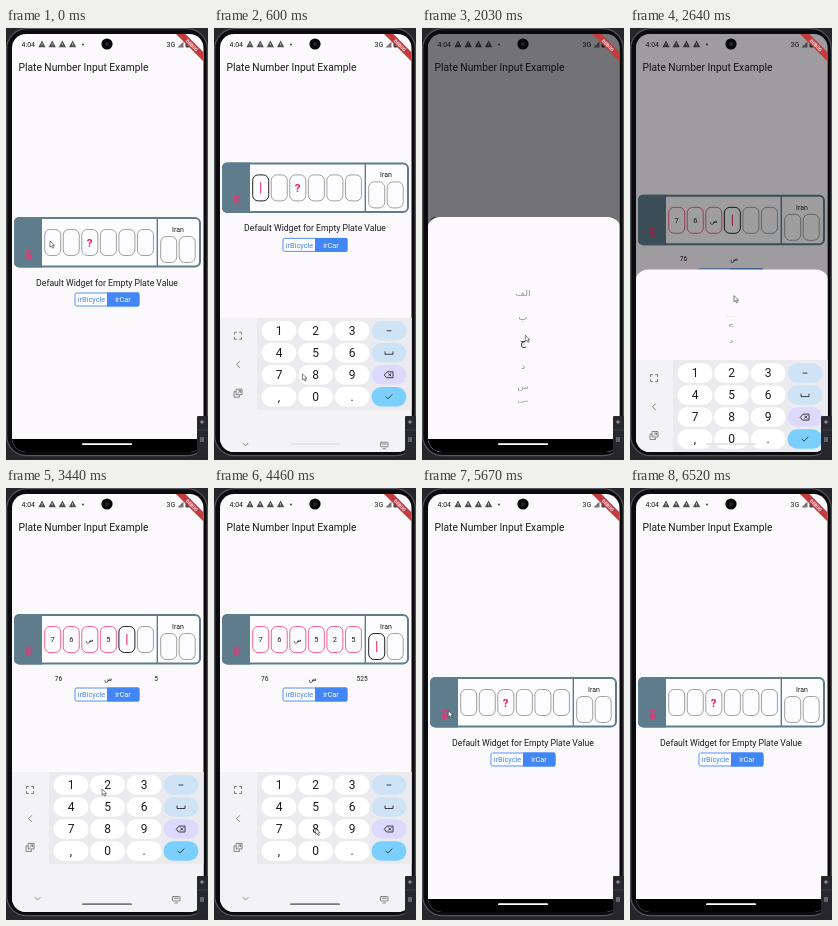
An HTML page for the animation above (6.54 s loop, 202x432 px).

```html
<!DOCTYPE html>
<html lang="en">
<head>
<meta charset="utf-8">
<title>Plate Number Input Example</title>
<style>
html, body { margin: 0; width: 100%; height: 100%; overflow: hidden; background: #26262a; }
svg { display: block; width: 100vw; height: 100vh; }
text { font-family: Roboto, "DejaVu Sans", sans-serif; fill: #1d1b20; }
.mid { text-anchor: middle; }
.line { fill: none; stroke: #2c2d31; stroke-width: .9; stroke-linecap: round; stroke-linejoin: round; }
.side .line { stroke: #77797e; }
.box { fill: #fdfcfe; stroke: #858b91; stroke-width: .8; }
.box.full { stroke: #ee3f78; }
.box.focus { stroke: #222; stroke-width: 1; }
.tone { fill: #5f7c8d; }
.edge { fill: none; stroke: #5f7c8d; stroke-width: 2; }
.trash { fill: none; stroke: #f2306f; }
.done .tone { fill: #f43f7b; }
.done .edge { stroke: #f43f7b; }
.done .trash { stroke: #5f7c8d; }
</style>
</head>
<body>
<svg viewBox="0 0 202 432" preserveAspectRatio="none">
  <defs><clipPath id="glass"><rect x="6" y="6" width="191.5" height="418" rx="14"/></clipPath></defs>
  <rect x=".7" y=".7" width="200.6" height="427" rx="20" fill="#0b0b0d" stroke="#56565c" stroke-width="1.2"/>
  <g clip-path="url(#glass)">
    <rect width="202" height="432" fill="#fcf9fd"/>
    <g id="status">
      <text x="15.500" y="19" font-size="7">4:04</text>
      <circle cx="77" cy="16.500" r="1" fill="#444"/>
      <text x="160.500" y="19" font-size="7">3G</text>
      <path d="M171.500 19.500h6v-6z" fill="#777"/>
      <rect x="179.500" y="13" width="4" height="6.500" rx=".8" fill="#444"/>
    </g>
    <text x="12.500" y="42.800" font-size="10.250">Plate Number Input Example</text>
    <g id="body">
      <g id="plate">
        <rect x="9" y="190" width="185" height="48.500" rx="5" fill="#fdfcfe"/>
        <path class="tone" d="M36 189v50.500H13a5 5 0 0 1-5-5V194a5 5 0 0 1 5-5z"/>
        <rect class="edge" x="9" y="190" width="185" height="48.500" rx="5"/>
        <path class="edge" d="M151.300 190v48.500" style="stroke-width:1.400"/>
        <path class="trash" d="M20 223h6.400M22 222.200h2.400M20.900 224v6.200h4.600V224M22.400 225.500v3.500M24 225.500v3.500"/>
        <text class="mid" x="172" y="204" font-size="7">Iran</text>
        <g id="boxes"></g>
        <text id="ask" class="mid" x="83.700" y="218.800" font-size="11.500" font-weight="700" style="fill:#e91e63">?</text>
        <rect id="caret" x="-.5" width="1" height="11" fill="#e91e63"/>
      </g>
      <text id="caption" class="mid" x="101" y="257.500" font-size="8.660">Default Widget for Empty Plate Value</text>
      <g id="values" font-size="6.600"></g>
      <g id="tabs" font-size="7.300">
        <rect x="69" y="265" width="64" height="13" rx="1.500" fill="#fdfcff" stroke="#4285f4" stroke-width=".9"/>
        <path d="M101 264.600h31q1.400 0 1.400 1.400v11q0 1.400-1.400 1.400H101z" fill="#4285f4"/>
        <text class="mid" x="85.500" y="274.200" style="fill:#4285f4">irBicycle</text>
        <text class="mid" x="117" y="274.200" style="fill:#fff">irCar</text>
      </g>
    </g>
    <rect id="scrim" width="202" height="432"/>
    <g id="sheet">
      <rect x="5" width="194" height="260" rx="13" fill="#fcf8fd"/>
      <g id="wheel" font-size="9.500"></g>
    </g>
    <rect id="nav" x="5" y="411" width="194" height="14"/>
    <g id="board">
      <rect x="5" width="194" height="160" fill="#f3f2f5"/>
      <g id="pad"><rect x="43" width="156" height="92" fill="#ebebef"/></g>
      <g id="letters"><rect x="43" width="156" height="110" fill="#ebebef"/></g>
      <g class="side">
        <path class="line" d="M29 125.500l2.500 2.500 2.500-2.500"/>
        <rect class="line" x="166.500" y="124.500" width="7.500" height="4.500" rx=".7"/>
        <path class="line" d="M168 126.300h4.500M169 131h2.500"/>
      </g>
    </g>
    <rect id="handle" x="76" y="415.200" width="50" height="1.900" rx=".95"/>
    <g transform="translate(186 17.300) rotate(45)">
      <rect x="-30" y="-3.300" width="60" height="6.600" fill="#c13c40"/>
      <text class="mid" y="1.700" font-size="4.600" font-weight="700" style="fill:#fff">DEBUG</text>
    </g>
  </g>
  <circle cx="101" cy="16" r="5.600" fill="#08080a"/>
  <circle cx="101" cy="16" r="2" fill="#20242e"/>
  <g>
    <rect x="191" y="388" width="12" height="38" rx="1" fill="#26282d"/>
    <path d="M194 394h4M196 392v4M195 409v5M197 409v5" stroke="#b5b8be" stroke-width=".8"/>
    <path d="M192 402h10" stroke="#4a4d54" stroke-width=".6"/>
  </g>
  <path id="mouse" d="M0 0v6.200l1.500-1.300 1.100 2.300 1.100-.5-1.100-2.300h2z" fill="#fff" stroke="#333" stroke-width=".6"/>
</svg>
<script>
const LOOP = 6540, START = 200, STEP = 101.25;
const $ = id => document.getElementById(id);

function add(parent, tag, attrs, label) {
  const el = document.createElementNS("http://www.w3.org/2000/svg", tag);
  for (const k in attrs) el.setAttribute(k, attrs[k]);
  if (label) el.textContent = label;
  parent.appendChild(el);
  return el;
}
const move = (el, x, y) => el.setAttribute("transform", `translate(${x} ${y})`);
const show = (el, on) => { el.style.display = on ? "" : "none"; };

// The screen refreshes about ten times a second
const snap = t => t < START ? 0 : START + Math.floor((t - START + 8) / STEP) * STEP;

const smooth = u => u * u * (3 - 2 * u);
const easeOut = u => 1 - (1 - u) ** 2.2;
const ramp = (t, start, span, ease = smooth) => ease(Math.min(1, Math.max(0, (t - start) / span)));

// Keyboard openings and closings; the page follows with a lag
const rises = [258, 2450], falls = [1274, 4800];
const sum = (list, f) => list.reduce((n, x) => n + f(x), 0);
const lift = t => sum(rises, s => ramp(t, s, 450, easeOut)) - sum(falls, s => ramp(t, s, 400));
const shift = t => sum(rises, s => ramp(t, s, 450)) - sum(falls, s => ramp(t, s + 70, 203));

// Typed characters with the time each one lands
const typed = [["7", 800], ["6", 1210], ["ص", 2540], ["5", 3340], ["2", 3850], ["5", 4160], ["8", 4460], ["4", 4760]];
const TAP = 300, CLEAR = 5570;

const keyX = i => 65 + i % 3 * 36.6;
const keyY = i => 13 + Math.floor(i / 3) * 22;

// Pointer stops: every pressed digit plus a few places on the way
const stops = typed.filter(([c]) => c > "0" && c <= "9")
  .map(([c, t]) => [t, keyX(c - 1), keyY(c - 1) + 284])
  .concat([[START, 44, 213], [600, 89, 346], [1410, 122, 308], [1750, 103, 325], [2640, 104, 267],
    [3440, 96, 301], [5060, 48, 314], [5470, 23, 225], [CLEAR, 23, 225], [6070, 40, 214]])
  .sort((a, b) => a[0] - b[0]);

function pointer(t) {
  const i = stops.findIndex(s => s[0] > t);
  if (i < 1) return i ? stops[stops.length - 1].slice(1) : stops[0].slice(1);
  const a = stops[i - 1], b = stops[i], u = (t - a[0]) / (b[0] - a[0]);
  return [a[1] + (b[1] - a[1]) * u, a[2] + (b[2] - a[2]) * u];
}

for (let i = 0; i < 4; i++) {
  const x = 36 + i * 10.2;
  add($("status"), "path", { d: `M${x} 12.600l3.600 6.600h-7.200z`, fill: "#4c4c50" });
  add($("status"), "path", { d: `M${x} 15v2M${x} 17.600v.7`, stroke: "#e4e2e6", "stroke-width": .7 });
}

const cells = typed.map(([c], i) => {
  const x = i < 6 ? 46.7 + i * 18.55 : 162.7 + (i - 6) * 18.5;
  const y = i < 6 ? 201.5 : 208.5;
  const box = add($("boxes"), "rect", { class: "box", x: x - 8, y, width: 16, height: 26, rx: 5.5 });
  const label = add($("boxes"), "text", { class: "mid", x, y: y + 15.8, "font-size": c > "9" ? 6.2 : 7.5 }, c);
  return { x, y, box, label };
});
const values = [0, 1, 2, 3].map(() => add($("values"), "text", { y: 255.5 }));

const items = ["الف", "ب", "ج", "د", "س", "ص", "ط", "ق", "ل", "م", "ن", "و", "ه", "ی"]
  .map(c => add($("wheel"), "text", { class: "mid" }, c));

const BLUE = "#cfe3f6", SKY = "#7bcffc";
function key(g, x, y, w, h, label, fill = "#fff", size = 10.5) {
  add(g, "rect", { x: x - w / 2, y: y - h / 2, width: w, height: h, rx: Math.min(w / 3, h / 2), fill });
  if (label) add(g, "text", { class: "mid", x, y: y + size * .36, "font-size": size }, label);
}
const icon = (g, x, y, d) => add(g, "path", { class: "line", d, transform: `translate(${x} ${y})` });
const erase = "M-4.500 0l2.500-3h6v6h-6zM-.4-1.200l2.400 2.400M2-1.200l-2.400 2.400";
const tick = "M-3 0l2 2 4-4";

function sideIcons(parent, y, gap) {
  const g = add(parent, "g", { class: "side" });
  icon(g, 24, y, "M-3.500-1.500v-2h2M3.500-1.500v-2h-2M-3.500 1.500v2h2M3.500 1.500v2h-2");
  icon(g, 24, y + gap, "M1.500-3l-3 3 3 3");
  icon(g, 24, y + gap * 2, "M-1.500-4h5.500v5.500h-5.500zM-2.500-1.500h-1.500v5.500h5.500v-1.500M0 0l2.500-2.500M.7-2.500h1.800v1.800");
}

const pad = $("pad");
[..."123456789,0."].forEach((c, i) => key(pad, keyX(i), keyY(i), 35, 19.5, c, "#fff", 12));
[[BLUE, "M-2 0h4"], [BLUE, "M-4-1v2.500h8v-2.500"], ["#ddd9fc", erase], [SKY, tick]].forEach(([fill, d], i) => {
  key(pad, 175, keyY(i * 3), 35, 19.5, "", fill);
  icon(pad, 175, keyY(i * 3), d);
});
sideIcons(pad, 18, 28.7);

const letters = $("letters");
const rowY = r => 31 + r * 22;
["qwertyuiop", "asdfghjkl", "zxcvbnm"].forEach((row, r) => [...row].forEach((c, i) =>
  key(letters, 120 + (i - (row.length - 1) / 2) * 14.65, rowY(r), 12.6, 18.5, c)));
key(letters, 58, rowY(2), 19, 18.5, "", BLUE);
icon(letters, 58, rowY(2), "M0-3.500l3.500 3.500h-2v3h-3v-3h-2z");
key(letters, 182, rowY(2), 19, 18.5, "", BLUE);
icon(letters, 182, rowY(2), erase);
key(letters, 58, rowY(3), 20, 18.5, "?123", "#c3d5e6", 7.5);
key(letters, 76, rowY(3), 12.6, 18.5, ",");
key(letters, 120, rowY(3), 72, 18.5);
key(letters, 164, rowY(3), 12.6, 18.5, ".");
key(letters, 182, rowY(3), 20, 18.5, "", SKY);
icon(letters, 182, rowY(3), tick);
sideIcons(letters, 27, 32);

function drawPlate(t) {
  const count = t >= CLEAR ? 0 : typed.filter(c => t >= c[1] - 5).length;
  const since = count ? typed[count - 1][1] : TAP;
  // The letter cell is filled from the sheet, so it takes no caret
  const focused = t >= TAP && t < CLEAR && count !== 2 && count < 8;
  cells.forEach((c, i) => {
    c.box.setAttribute("class", "box" + (i < count ? " full" : focused && i === count ? " focus" : ""));
    show(c.label, i < count);
  });
  $("plate").setAttribute("class", count === 8 ? "done" : "");
  show($("ask"), count < 3);
  show($("caret"), focused && (t - since) % 1000 < 500);
  if (focused) move($("caret"), cells[count].x, cells[count].y + 7.5);
  show($("caption"), !count);
  move($("tabs"), 0, count ? -2 : 0);

  // Value parts share the row with equal gaps
  const s = typed.slice(0, count).map(c => c[0]).join("");
  const parts = [s.slice(0, 2), s.slice(2, 3), s.slice(3, 6), s.length > 6 ? "IR " + s.slice(6) : ""];
  values.forEach((v, i) => { v.textContent = parts[i]; });
  const widths = values.map((v, i) => parts[i] ? v.getBBox().width : 0);
  const gap = (187 - sum(widths, w => w)) / (count > 6 ? 5 : 4);
  let x = 7;
  values.forEach((v, i) => {
    v.setAttribute("x", x += gap);
    x += widths[i];
  });
}

function drawWheel(t) {
  const pos = 5 * ramp(t, 1750, 690);
  items.forEach((el, i) => {
    const a = (i - pos) * .358;
    show(el, Math.abs(a) < 1.5);
    el.setAttribute("transform", `translate(101 ${118 + 71.6 * Math.sin(a)}) scale(1 ${Math.max(.05, Math.cos(a))}) translate(0 3)`);
    el.setAttribute("opacity", Math.abs(a) < .18 ? 1 : .45);
  });
}

function draw(t) {
  const top = 432 - 148 * lift(t);
  move($("board"), 0, top);
  move($("body"), 0, -63 * shift(t));
  move($("sheet"), 0, 432 - 243 * (ramp(t, 1210, 330, easeOut) - ramp(t, 2540, 300)));
  $("scrim").setAttribute("opacity", .54 * (ramp(t, 1210, 320) - ramp(t, 2510, 330)));
  const text = (t > falls[0] && t < rises[1]) || t > falls[1];
  show(pad, !text);
  show(letters, text);
  show($("nav"), top >= 421);
  const rising = rises.some(s => t > s && t < s + 450);
  $("handle").setAttribute("fill", top >= 421 ? "#fff" : rising ? "#e2e1e5" : "#77797e");
  move($("mouse"), ...pointer(t));
  show($("mouse"), t < 6275);
  drawPlate(t);
  drawWheel(t);
}

function loop() {
  draw(snap(performance.now() % LOOP));
  requestAnimationFrame(loop);
}
loop();
</script>
</body>
</html>
```
